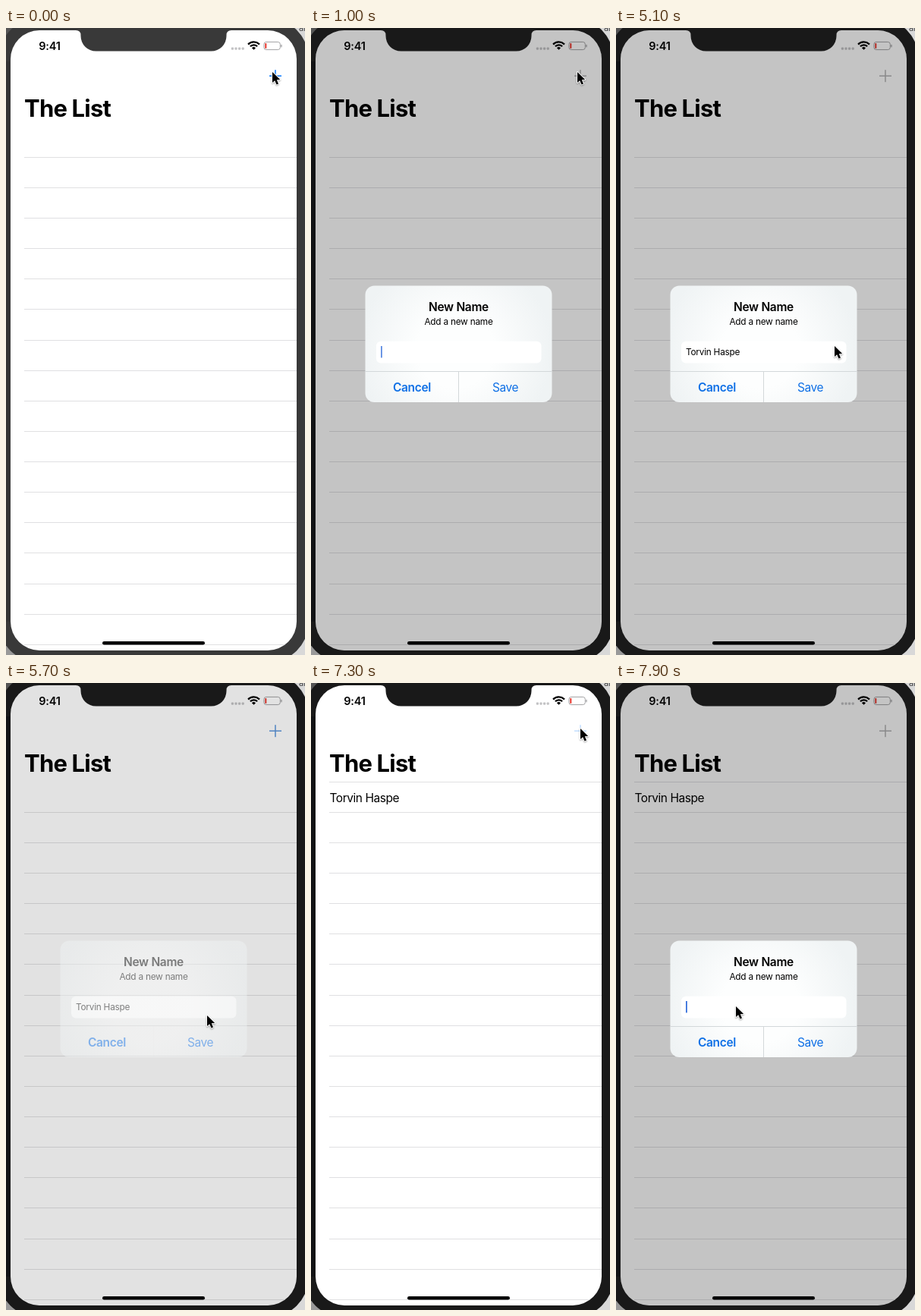
An HTML page with a canvas that plays this animation: 394x826 px, repeating every 8 s.

```html
<!DOCTYPE html>
<html lang="en">
<head>
<meta charset="utf-8">
<title>The List</title>
<style>
  html, body { margin: 0; width: 100%; height: 100%; overflow: hidden; background: #d8d8d8; }
  canvas { display: block; width: 394px; height: 826px; }
</style>
</head>
<body>
<canvas id="stage"></canvas>
<script>
const W = 394, H = 826, LOOP = 8000, STEP = 100;
const canvas = document.getElementById('stage');
const ratio = window.devicePixelRatio || 1;
canvas.width = W * ratio;
canvas.height = H * ratio;
const ctx = canvas.getContext('2d');

const NAME = 'Torvin Haspe';
const KEY_TIMES = [1600, 1800, 1900, 2100, 2300, 2500, 3000, 3100, 3500, 3700, 4200, 4400];
const BLUE = '#0f70e6';
const SCREEN = { x: 6, y: 3, w: 377, h: 817, r: 38 };
const POINTER = [
  [0, 351, 58], [4700, 351, 58], [5000, 312, 290], [5200, 264, 548], [5400, 258, 470],
  [5550, 259, 466], [5700, 265, 438], [5900, 298, 335], [6100, 346, 160], [6300, 376, 76],
  [6500, 380, 64], [6800, 355, 60], [7450, 355, 60], [7600, 265, 255], [7800, 157, 455],
  [7900, 158, 426]
];

const clamp = v => Math.max(0, Math.min(1, v));
const mix = (a, b, k) => a + (b - a) * k;
const easeOut = v => 1 - Math.pow(1 - clamp(v), 3);
const ramp = (t, from, to) => clamp((t - from) / (to - from));

function alertLevel(t) {
  if (t < 3000) return easeOut((t - 365) / 500);
  if (t < 7000) return 1 - easeOut((t - 5610) / 420);
  return easeOut((t - 7350) / 450);
}

function caretLevel(t) {
  if (t < 1500) return 1 - ramp(t, 950, 1200);
  if (t < 4700) return ramp(t, 1400, 1600);
  if (t < 5600) return 1 - ramp(t, 4700, 5000) + ramp(t, 5200, 5400) - ramp(t, 5400, 5600);
  return t < 7000 ? 0 : 1;
}

function pointerAt(t) {
  const i = POINTER.findIndex(p => p[0] > t);
  if (i < 0) return POINTER[POINTER.length - 1].slice(1);
  const a = POINTER[i - 1], b = POINTER[i], k = ramp(t, a[0], b[0]);
  return [mix(a[1], b[1], k), mix(a[2], b[2], k)];
}

function fillRect(x, y, w, h, color) {
  ctx.fillStyle = color;
  ctx.fillRect(x, y, w, h);
}

function roundRect(x, y, w, h, r, color) {
  ctx.beginPath();
  ctx.roundRect(x, y, w, h, r);
  ctx.fillStyle = color;
  ctx.fill();
}

function text(str, x, y, size, { weight = 400, color = '#000', align = 'left', track = -0.02 } = {}) {
  ctx.font = `${weight} ${size}px Inter, "Liberation Sans", sans-serif`;
  ctx.letterSpacing = `${track * size}px`;
  ctx.textAlign = align;
  ctx.fillStyle = color;
  ctx.fillText(str, x, y);
  return ctx.measureText(str).width;
}

function drawBackdrop(frame, edge) {
  fillRect(0, 0, W, H, '#d8d8d8');
  fillRect(0, 0, 40, 60, '#555');
  fillRect(0, 770, 40, 56, '#999');
  text('ar', 386, 4, 11, { color: '#444' });
  roundRect(-10, -13, 409, 849, 54, frame);
  fillRect(0, 44, 5, 738, edge);
}

function drawStatusBar() {
  text('9:41', 57.5, 28.7, 14.5, { weight: 600, align: 'center', track: -0.01 });
  for (let i = 0; i < 4; i++) roundRect(296.8 + i * 4.6, 25.5, 3.2, 3.2, 1, '#c3c3c5');

  ctx.strokeStyle = ctx.fillStyle = '#000';
  ctx.lineWidth = 2.3;
  for (const r of [6.3, 10.2]) {
    ctx.beginPath();
    ctx.arc(326.5, 28.6, r, -Math.PI * 0.76, -Math.PI * 0.24);
    ctx.stroke();
  }
  ctx.beginPath();
  ctx.moveTo(326.5, 28.8);
  ctx.arc(326.5, 28.8, 3.6, -Math.PI * 0.76, -Math.PI * 0.24);
  ctx.fill();

  ctx.beginPath();
  ctx.roundRect(339.9, 18.4, 21.4, 10.2, 3);
  ctx.strokeStyle = '#a2a2a4';
  ctx.lineWidth = 1;
  ctx.stroke();
  roundRect(341.3, 20, 2, 7, 0.8, '#e8362c');
  roundRect(362.3, 21.8, 1.3, 3.6, 0.6, '#a2a2a4');
}

function drawPlus(level, pressed) {
  const color = [mix(10, 178, level), mix(122, 178, level), mix(255, 180, level)].map(Math.round);
  ctx.globalAlpha = pressed ? 0.25 : 1;
  fillRect(347, 62.4, 16, 1.5, `rgb(${color})`);
  fillRect(354.2, 55.2, 1.5, 16, `rgb(${color})`);
  ctx.globalAlpha = 1;
}

function drawList(hasRow) {
  text('The List', 24, 116.5, 31, { weight: 700, track: -0.026 });
  for (let i = hasRow ? -1 : 0; i < 17; i++) {
    fillRect(24, Math.floor(170.3 + i * 40.13), 359, 1, '#e0e0e2');
  }
  if (hasRow) text(NAME, 24.5, 156.5, 15.5, { track: -0.03 });
}

function drawNotch(color) {
  ctx.beginPath();
  ctx.moveTo(92, 2);
  ctx.lineTo(92, 3);
  ctx.quadraticCurveTo(98.5, 3, 98.5, 9.5);
  ctx.arcTo(98.5, 30.5, 119, 30.5, 20);
  ctx.arcTo(290.5, 30.5, 290.5, 9.5, 20);
  ctx.lineTo(290.5, 9.5);
  ctx.quadraticCurveTo(290.5, 3, 297, 3);
  ctx.lineTo(297, 2);
  ctx.fillStyle = color;
  ctx.fill();
}

function drawAlert(level, scale, typed, caret) {
  const cx = 194.5, cy = 416.2;
  ctx.save();
  ctx.globalAlpha = level;
  ctx.translate(cx, cy);
  ctx.scale(scale, scale);
  ctx.translate(-cx, -cy);

  const glow = ctx.createRadialGradient(190, 424, 50, 190, 424, 128);
  glow.addColorStop(0, '#fdfefe');
  glow.addColorStop(1, '#eff3f4');
  roundRect(71.5, 339.5, 246, 153.5, 12, glow);
  roundRect(86, 412.8, 217.5, 28.6, 6, '#fff');

  ctx.globalAlpha = Math.pow(level, 4);
  fillRect(71.5, 452, 246, 1, '#d3d8da');
  fillRect(194, 452, 1, 41, '#d3d8da');
  ctx.globalAlpha = level;

  text('New Name', cx, 372.6, 15.5, { weight: 600, align: 'center' });
  text('Add a new name', cx, 390.8, 11.84, { align: 'center' });
  text('Cancel', 133, 479, 15.5, { weight: 600, align: 'center', color: BLUE });
  text('Save', 256, 479, 15.5, { align: 'center', color: BLUE, track: -0.03 });
  const width = text(typed, 92, 431, 11.84);

  ctx.globalAlpha = level * caret;
  fillRect(92 + width, 419, 1.8, 15.4, '#3570dc');
  ctx.restore();
}

function drawPointer([x, y]) {
  ctx.save();
  ctx.translate(x, y);
  ctx.beginPath();
  ctx.moveTo(0, 0);
  for (const [px, py] of [[0, 14], [3.2, 11.2], [5.5, 16.5], [8, 15.4], [5.8, 10.2], [10.2, 10]]) {
    ctx.lineTo(px, py);
  }
  ctx.closePath();
  ctx.shadowColor = 'rgba(0,0,0,.35)';
  ctx.shadowBlur = 2 * ratio;
  ctx.shadowOffsetY = ratio;
  ctx.strokeStyle = '#fff';
  ctx.lineWidth = 1.8;
  ctx.lineJoin = 'round';
  ctx.stroke();
  ctx.shadowColor = 'transparent';
  ctx.fillStyle = '#000';
  ctx.fill();
  ctx.restore();
}

function draw(t) {
  const level = alertLevel(t);
  const closing = t > 5000 && t < 7000;
  const focused = t >= 100;
  const frame = focused ? '#191919' : '#393939';
  const pressed = (t >= 100 && t < 400) || (t >= 7000 && t < 7400);
  const typed = t < 7000 ? NAME.slice(0, KEY_TIMES.filter(k => k <= t).length) : '';

  ctx.setTransform(ratio, 0, 0, ratio, 0, 0);
  drawBackdrop(frame, focused ? '#111214' : '#343434');

  ctx.save();
  ctx.beginPath();
  ctx.roundRect(SCREEN.x, SCREEN.y, SCREEN.w, SCREEN.h, SCREEN.r);
  ctx.clip();
  fillRect(0, 0, W, H, '#fff');
  drawList(t >= 6000);
  drawStatusBar();
  drawPlus(level, pressed);
  fillRect(0, 0, W, H, `rgba(0,0,0,${0.232 * level})`);
  if (level > 0) drawAlert(level, closing ? 1 : 1.2 - 0.2 * level, typed, caretLevel(t));
  roundRect(127, 808, 135, 4.6, 2.3, '#000');
  drawNotch(frame);
  ctx.restore();

  drawPointer(pointerAt(t));
}

const start = performance.now();
function tick() {
  const elapsed = (performance.now() - start) % LOOP;
  draw(Math.floor(elapsed / STEP) * STEP);
  requestAnimationFrame(tick);
}
tick();
</script>
</body>
</html>
```
